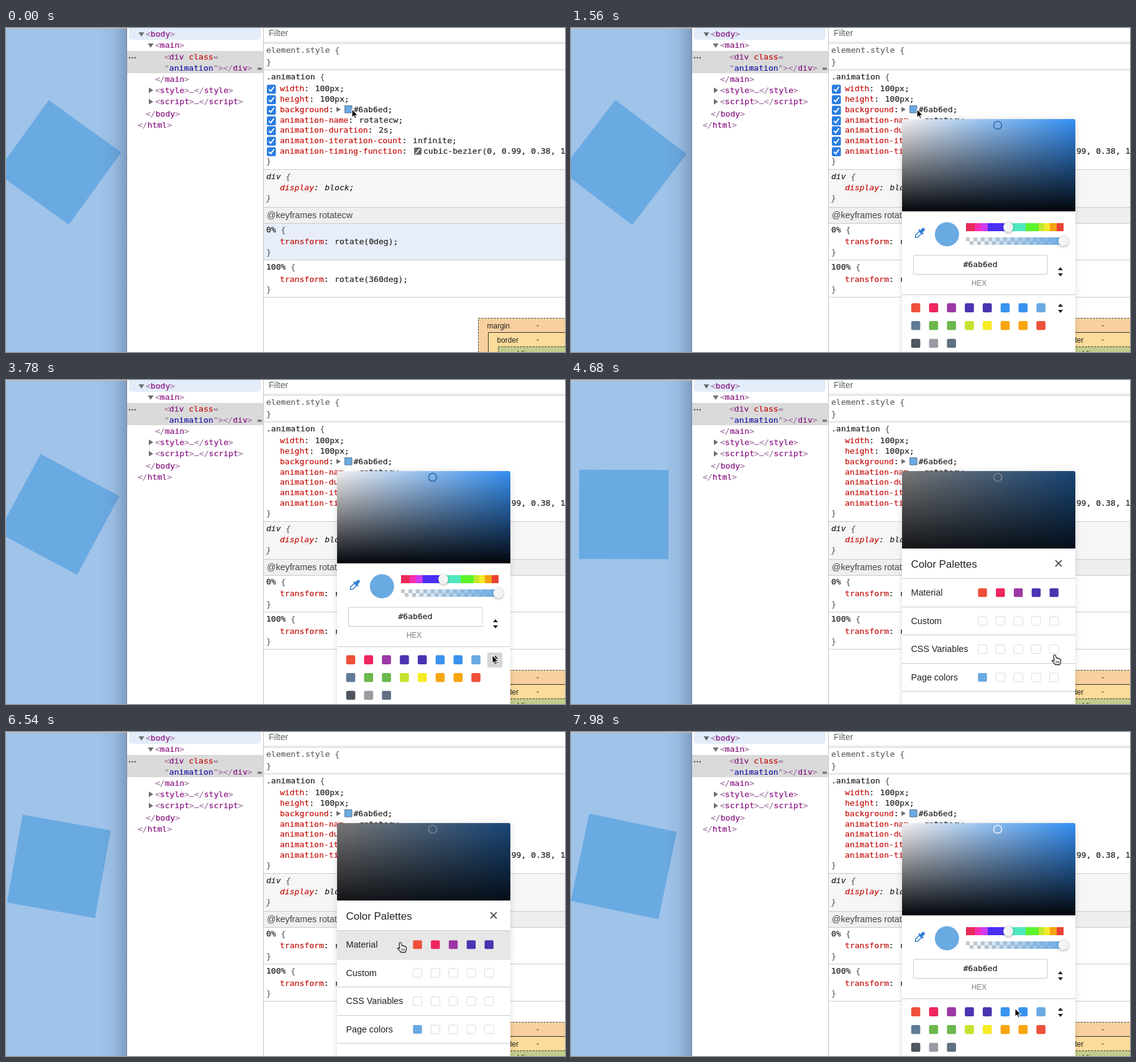
An HTML page with a canvas that plays this animation: 900 px wide and 523 px high, repeating every 8000 ms.

```html
<!DOCTYPE html>
<html lang="en">
<head>
<meta charset="utf-8">
<title>Color picker palettes</title>
<style>
html, body { margin: 0; width: 100%; height: 100%; overflow: hidden; }
canvas { display: block; }
</style>
</head>
<body>
<canvas id="stage" width="900" height="523"></canvas>
<script>
const ctx = document.getElementById('stage').getContext('2d');
const MONO = '13.08px "DejaVu Sans Mono", monospace';
const SANS = '"Liberation Sans", Arial, sans-serif';
const LOOP = 8000, STEP = 60;
const OPEN_POPUP = 420, LEAVE_RULE = 1800, OPEN_PALETTES = 3960, CLOSE_PALETTES = 7620;
const BLUE = '#6aaae2', LINE = '#cbcbcb', RED = '#c5100c', DARK = '#222', GRAY = '#5f6368';
const TAG = '#881280', PUNCT = '#a27aa4';

// time, x, y of the pointer tip
const POINTER = [
  [0, 557, 131], [1740, 557, 131], [2300, 640, 260], [3060, 783, 444],
  [4140, 783, 444], [4200, 779, 444], [4740, 779, 444], [5300, 631, 471],
  [5700, 631, 471], [6360, 635, 340], [7600, 635, 340], [7940, 715, 446]
];

const clamp = v => Math.min(1, Math.max(0, v));
const ease = v => v * v * (3 - 2 * v);
const bezier = (s, a, b) => 3 * (1 - s) ** 2 * s * a + 3 * (1 - s) * s * s * b + s ** 3;

function rotation(t) {
  const x = (t / 1794 + 0.682) % 1;
  let lo = 0, hi = 1;
  for (let i = 0; i < 24; i++) {
    const mid = (lo + hi) / 2;
    if (bezier(mid, 0, 0.38) < x) lo = mid; else hi = mid;
  }
  return bezier(lo, 0.99, 1.29) * 2 * Math.PI;
}

function pointerAt(t) {
  let i = 0;
  while (i < POINTER.length - 2 && t >= POINTER[i + 1][0]) i++;
  const [t0, x0, y0] = POINTER[i], [t1, x1, y1] = POINTER[i + 1];
  const k = ease(clamp((t - t0) / (t1 - t0)));
  return [x0 + (x1 - x0) * k, y0 + (y1 - y0) * k];
}

function rect(x, y, w, h, fill) {
  ctx.fillStyle = fill;
  ctx.fillRect(x, y, w, h);
}
function round(x, y, w, h, r, fill, stroke) {
  ctx.beginPath();
  ctx.roundRect(x, y, w, h, r);
  paint(fill, stroke);
}
function circle(x, y, r, fill, stroke, width) {
  ctx.beginPath();
  ctx.arc(x, y, r, 0, 7);
  paint(fill, stroke, width);
}
function shape(points, fill, stroke, width, open) {
  ctx.beginPath();
  for (let i = 0; i < points.length; i += 2) ctx.lineTo(points[i], points[i + 1]);
  if (!open) ctx.closePath();
  paint(fill, stroke, width);
}
function paint(fill, stroke, width = 1) {
  if (fill) { ctx.fillStyle = fill; ctx.fill(); }
  if (stroke) { ctx.strokeStyle = stroke; ctx.lineWidth = width; ctx.stroke(); }
}
function shadowed(blur, alpha, draw) {
  ctx.save();
  ctx.shadowColor = `rgba(0,0,0,${alpha})`;
  ctx.shadowBlur = blur;
  ctx.shadowOffsetY = 1;
  draw();
  ctx.restore();
}
function label(x, y, text, size, color = DARK, align = 'left') {
  ctx.font = size + 'px ' + SANS;
  ctx.textAlign = align;
  ctx.fillStyle = color;
  ctx.fillText(text, x, y + size * 0.35);
  ctx.textAlign = 'left';
}
// Monospace runs: text, color, text, color... Returns the end of the last run.
function code(x, y, runs, style = '') {
  ctx.font = style + ' ' + MONO;
  ctx.lineWidth = 0.2;
  for (let i = 0; i < runs.length; i += 2) {
    ctx.fillStyle = ctx.strokeStyle = runs[i + 1];
    ctx.fillText(runs[i], x, y + 4);
    ctx.strokeText(runs[i], x, y + 4);
    x += ctx.measureText(runs[i]).width;
  }
  return x;
}
function declaration(y, name, value, style) {
  const end = code(441, y, [name, RED, ': ', DARK], style);
  code(end + 1.5, y, [value, DARK], style);
}
function markup(x, y, source) {
  const runs = source.split(/([<>\/…]+)/).flatMap(part => [part, /[<>\/]/.test(part) ? PUNCT : TAG]);
  code(x, y, runs);
}
function gradient(x0, y0, x1, y1, ...colors) {
  const g = ctx.createLinearGradient(x0, y0, x1, y1);
  colors.forEach((c, i) => g.addColorStop(i / (colors.length - 1), c));
  return g;
}
const arrowDown = (x, y) => shape([x - 4.5, y - 3, x + 4.5, y - 3, x, y + 4], '#6e6e6e');
const arrowRight = (x, y, s = 4.5) => shape([x - 3, y - s, x + 4, y, x - 3, y + s], '#6e6e6e');
function upDown(x, y) {
  shape([x - 4, y - 2, x, y - 7, x + 4, y - 2], '#222');
  shape([x - 4, y + 3, x, y + 8, x + 4, y + 3], '#222');
}

function drawPage(t) {
  rect(0, 0, 195, 523, '#9fc3e9');
  ctx.save();
  ctx.translate(85, 217);
  ctx.rotate(rotation(t));
  rect(-72, -72, 144, 144, BLUE);
  ctx.restore();
  rect(150, 0, 45, 523, gradient(150, 0, 195, 0, 'rgba(60,75,110,0)', 'rgba(60,75,110,.07)', 'rgba(60,75,110,.32)'));
  rect(0, 0, 195, 1, '#d9bba6');
  rect(194, 0, 1, 523, '#78889c');
}

function drawElements() {
  rect(195, 0, 219, 523, '#fff');
  round(198, -6, 212, 25, 5, '#e3ecf9');
  rect(195, 37, 219, 36, '#dadada');
  arrowDown(218, 10);
  markup(225, 10, '<body>');
  arrowDown(233, 28);
  markup(240, 28, '<main>');
  for (let i = 0; i < 3; i++) circle(199 + i * 4.5, 48, 1.3, '#555');
  code(255, 47, ['<', PUNCT, 'div ', TAG, 'class', RED, '=', PUNCT]);
  code(255, 64.5, ['"', PUNCT, 'animation', '#1a1aa6', '"></', PUNCT, 'div', TAG, '>', PUNCT, ' =', '#555']);
  markup(240, 83, '</main>');
  arrowRight(233, 100.5);
  markup(240, 101, '<style>…</style>');
  arrowRight(233, 119);
  markup(240, 119, '<script>…<\/script>');
  markup(225, 138.5, '</body>');
  markup(212, 156.5, '</html>');
}

function drawStyles(hovered, keyframeLit) {
  rect(414, 0, 486, 523, '#fff');
  rect(414, 21, 486, 3, '#f3f3f3');
  rect(414, 228, 486, 61, '#f6f6f6');
  rect(414, 289, 486, 27, '#efefef');
  if (keyframeLit) rect(414, 316, 486, 58, '#e7eef9');
  for (const y of [24, 67, 228, 289, 315, 374, 434]) rect(414, y, 486, 1, LINE);
  rect(414, 0, 1, 523, '#c4c4c4');

  label(423, 8.5, 'Filter', 14, GRAY);
  code(419, 36, ['element.style {', GRAY]);
  code(419, 55, ['}', GRAY]);
  code(419, 79, ['.animation', DARK, ' {', GRAY]);
  const rules = [
    ['width', '100px;'], ['height', '100px;'], ['background', ''], ['animation-name', 'rotatecw;'],
    ['animation-duration', '2s;'], ['animation-iteration-count', 'infinite;'], ['animation-timing-function', '']
  ];
  rules.forEach(([name, value], i) => {
    const y = Math.round(98.3 + i * 16.75);
    declaration(y, name, value);
    if (!hovered) return;
    round(420, y - 6.5, 14.5, 14.5, 2.5, '#2b7de1');
    shape([423.3, y + 1, 426.2, y + 4, 431.4, y - 3], null, '#fff', 2, true);
  });
  arrowRight(535, 131.5, 4);
  round(545.5, 125.5, 11.5, 11.5, 0, BLUE, '#55718c');
  code(559.5, 132, ['#6ab6ed;', DARK]);
  round(657, 193, 12, 11.5, 2, '#666');
  ctx.beginPath();
  ctx.moveTo(659, 202);
  ctx.bezierCurveTo(664, 202, 662, 195.5, 667, 195.5);
  paint(null, '#fff', 1.7);
  code(672, 199, ['cubic-bezier(0, 0.99, 0.38, 1', DARK]);
  code(419, 215, ['}', GRAY]);

  code(419, 240, ['div', DARK, ' {', GRAY], 'italic');
  declaration(258, 'display', 'block;', 'italic');
  code(419, 275, ['}', GRAY], 'italic');
  label(420, 302, '@keyframes rotatecw', 14.25, '#444');
  [['0%', 0, 325.5], ['100%', 360, 386]].forEach(([step, angle, y]) => {
    code(419, y, [step, DARK, ' {', GRAY]);
    declaration(y + 19.5, 'transform', `rotate(${angle}deg);`);
    code(419, y + 36, ['}', GRAY]);
  });

  [[760, 468, '#f8d09f', 1], [776, 491, '#fcdc9b', 0], [792, 514, '#c2cd8b', 1]].forEach(([x, y, fill, dashed]) => {
    ctx.setLineDash(dashed ? [3, 2] : []);
    ctx.beginPath();
    ctx.rect(x + 0.5, y + 0.5, 400, 200);
    paint(fill, '#333');
  });
  ctx.setLineDash([]);
  label(774.5, 480.5, 'margin', 12);
  label(790.5, 503.5, 'border', 12);
  label(806, 526, 'padding', 12);
  label(856, 480, '-', 12, DARK, 'center');
  label(856, 503, '-', 12, DARK, 'center');
}

const SWATCHES = [
  ['#ee503a', '#ee255f', '#9c38a4', '#4c33b2', '#4634b0', '#3993ef', '#3993ef', BLUE],
  ['#607b98', '#6bb84d', '#6bb84d', '#c6e32e', '#f7eb24', '#f8a50e', '#f8a50e', '#ee503a'],
  ['#50565f', '#999ba2', '#607082']
];
const HUES = [
  [636, '#ea2956'], [650, '#f52fb2'], [660, '#cf3af0'], [671, '#4a2ef6'], [697, '#3c8ff2'], [708, '#50e9bf'],
  [732, '#5cf32b'], [753, '#c3e82e'], [762, '#f6ea2a'], [771, '#f6a210'], [782, '#ea4033'], [793]
];

function drawPicker(t, pointer, dim) {
  shadowed(10, 0.14, () => round(533, 147, 279, 390, 3, '#fff'));
  shape([542, 147.5, 551.5, 138, 561, 147.5], '#fff', '#ddd', 0.6);
  rect(542, 147, 19, 2, '#fff');

  ctx.save();
  ctx.beginPath();
  ctx.roundRect(533, 147, 279, 149, [3, 3, 0, 0]);
  ctx.clip();
  rect(533, 147, 279, 149, gradient(533, 0, 812, 0, '#f4f2f2', '#338ff2'));
  rect(533, 147, 279, 149, gradient(0, 147, 0, 296, 'rgba(3,6,12,0)', 'rgb(3,6,12)'));
  ctx.restore();
  circle(687, 157, 6.5, null, t >= CLOSE_PALETTES ? '#eef4fa' : dim ? '#8d9cab' : '#2c69a5', 1.5);

  // Eyedropper
  ctx.save();
  ctx.translate(561.5, 331);
  ctx.rotate(Math.PI / 4);
  round(-2.6, -10.5, 5.2, 8, 2.4, '#2f7fd0');
  rect(-5, -4, 10, 2.4, '#2f7fd0');
  shape([-2.5, -1.5, -2.5, 7, 0, 10, 2.5, 7, 2.5, -1.5], '#fff', '#2f7fd0', 1.5);
  ctx.restore();

  circle(605.3, 333, 19.5, BLUE);
  for (let i = 0; i < HUES.length - 1; i++)
    rect(HUES[i][0], 315, HUES[i + 1][0] - HUES[i][0], 13, HUES[i][1]);
  rect(636, 338, 160, 12, '#fff');
  for (let i = 0; i < 26; i++)
    for (let j = i % 2; j < 2; j += 2) rect(636 + i * 6, 338 + j * 6, 6, 6, '#c9c9c9');
  rect(636, 338, 160, 12, gradient(636, 0, 796, 0, 'rgba(106,170,226,0)', BLUE));
  shadowed(4, 0.35, () => circle(704, 321.5, 8, '#f4f4f4'));
  shadowed(4, 0.35, () => circle(792.5, 344, 8, '#f4f4f4'));

  round(551.5, 367, 215.5, 30.5, 1, '#fff', '#c8c8c8');
  code(631.5, 382.3, ['#6ab6ed', DARK]);
  upDown(788, 393);
  label(657, 412, 'HEX', 12, '#808080', 'center');
  rect(533, 430, 279, 1, LINE);
  SWATCHES.forEach((row, j) => row.forEach((color, i) =>
    round(547.7 + i * 28.8, 444.3 + j * 28.7, 14.6, 14.6, 2.5, color)));
  if (Math.abs(pointer[0] - 787) < 12 && Math.abs(pointer[1] - 452) < 12) round(775, 440, 24, 24, 2, '#d6d6d6');
  upDown(788, 452);

  if (dim) drawPalettes(t, pointer, dim);
}

function drawPalettes(t, pointer, shown) {
  ctx.save();
  ctx.beginPath();
  ctx.roundRect(533, 147, 279, 376, [3, 3, 0, 0]);
  ctx.clip();
  rect(533, 147, 279, 376, `rgba(0,0,0,${0.5 * shown})`);
  circle(687, 157, 6.5, null, '#8d9cab', 1.2);
  ctx.translate(0, 251 * (1 - shown));
  rect(533, 272, 279, 260, '#fff');
  label(547.5, 297, 'Color Palettes', 16.9);
  shape([780, 291, 790, 301], null, '#555', 1.8, true);
  shape([790, 291, 780, 301], null, '#555', 1.8, true);
  ['Material', 'Custom', 'CSS Variables', 'Page colors'].forEach((name, j) => {
    const top = 320 + j * 45.6, y = top + 23;
    if (t > 4740 && pointer[1] >= top && pointer[1] < top + 45.6) rect(533, top, 279, 45.6, '#e7e7e7');
    label(547.5, y, name, 14.3);
    for (let i = 0; i < 5; i++) {
      const color = j === 0 ? SWATCHES[0][i] : j === 3 && i === 0 ? BLUE : null;
      round(655.3 + i * 28.8, y - 6.7, 14.4, 14, 2, color, color ? null : '#d9d9d9');
    }
  });
  for (let i = 0; i < 5; i++) rect(533, Math.round(320 + i * 45.6), 279, 1, LINE);
  ctx.restore();
}

function drawPointer([x, y], hand) {
  ctx.save();
  ctx.translate(x, y);
  ctx.lineJoin = 'round';
  if (hand) {
    ctx.beginPath();
    ctx.moveTo(-2, 1.5);
    ctx.bezierCurveTo(-2, -0.7, 1.3, -0.7, 1.6, 1.5);
    ctx.lineTo(2.2, 5);
    ctx.quadraticCurveTo(4, 4, 5, 5.6);
    ctx.quadraticCurveTo(7, 4.8, 7.6, 6.6);
    ctx.quadraticCurveTo(9.8, 6.2, 9.6, 9);
    ctx.quadraticCurveTo(9.6, 12, 8, 15.5);
    ctx.lineTo(1, 15.5);
    ctx.quadraticCurveTo(-2, 12, -4.5, 9.6);
    ctx.quadraticCurveTo(-4.6, 7.2, -1, 9.4);
    ctx.closePath();
    paint('#fff', '#222', 1.3);
    for (const fx of [2, 4.2, 6.4]) shape([fx, 9.5, fx, 13], null, '#222', 0.9, true);
  } else {
    shape([0, 0, 0, 13.5, 3, 10.8, 5, 15.2, 7.2, 14.2, 5.3, 10, 9.3, 9.7], '#000', '#fff', 1.1);
  }
  ctx.restore();
}

function draw(now) {
  const t = Math.floor(now % LOOP / STEP) * STEP;
  const pointer = pointerAt(t);
  const dim = ease(clamp((t - OPEN_PALETTES) / 200)) * (1 - ease(clamp((t - CLOSE_PALETTES) / 180)));
  drawPage(t);
  drawElements();
  drawStyles(t < LEAVE_RULE, t < OPEN_POPUP);
  if (t >= OPEN_POPUP) drawPicker(t, pointer, dim);
  drawPointer(pointer, t >= 4140 && t < CLOSE_PALETTES + 60);
}

let start;
function tick(now) {
  start ??= now;
  draw(now - start);
  requestAnimationFrame(tick);
}
draw(0);
requestAnimationFrame(tick);
</script>
</body>
</html>
```
